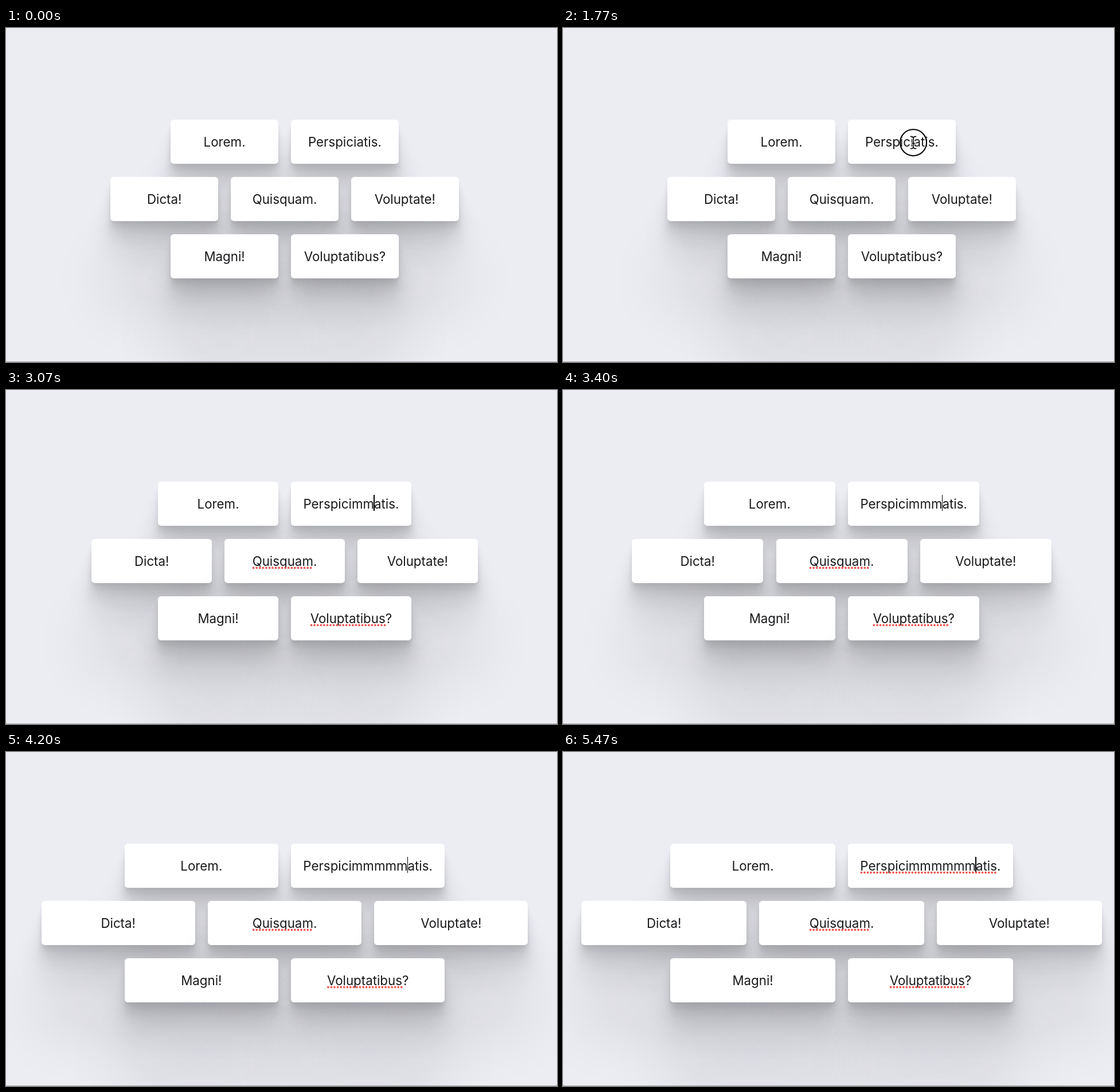
Animation of 961 by 583 pixels, one loop 5760 ms. Source, as an HTML page:

```html
<!DOCTYPE html>
<html lang="en">
<head>
<meta charset="utf-8">
<title>Growing cards</title>
<style>
  html, body { margin: 0; width: 100%; height: 100%; overflow: hidden; background: #ecedf3; }
  #stage {
    position: relative; width: 961px; height: 583px; overflow: hidden;
    font: 400 22.3px/32px Inter, sans-serif; font-optical-sizing: none; color: #18191b;
  }
  .card {
    --ink: 0, 12, 16;
    position: absolute; height: 77.5px; border-radius: 5.6px; background: #fff;
    display: flex; align-items: center; justify-content: center; white-space: pre;
    box-shadow:
      0 3.9px 3.1px rgba(var(--ink), .034),
      0 9.4px 7.4px rgba(var(--ink), .048),
      0 17.5px 14px rgba(var(--ink), .06),
      0 31.2px 25px rgba(var(--ink), .072),
      0 58.5px 46.8px rgba(var(--ink), .086),
      0 140px 112px rgba(var(--ink), .12);
  }
  .caret { position: relative; }
  .caret i {
    position: absolute; left: -.6px; top: -1.2px; width: 1.5px; height: 28px; background: #000;
  }
  #edge { position: absolute; left: 0; top: 582px; width: 961px; height: 1px; background: #a9aaad; }
  svg { position: absolute; left: 0; top: 0; }
  .dots line { stroke: #f2544f; stroke-width: 3.8; stroke-linecap: round; stroke-dasharray: 0 5.56; }
</style>
</head>
<body>
<div id="stage">
  <div id="edge"></div>
  <svg id="overlay" width="961" height="583" fill="none">
    <g class="dots"></g>
    <circle id="ring" cx="611" cy="200" r="23" stroke="#000" stroke-width="2"/>
    <g id="beam" stroke-linecap="round">
      <path id="beamHalo" stroke="#fff" stroke-width="3.6"/>
      <path id="beamLine" stroke="#000" stroke-width="1.6"/>
    </g>
    <path id="arrow" d="M0 0V17.5L4.1 13.7L6.9 20L9.8 18.7L7 12.6H12.4Z"
      fill="#000" stroke="#fff" stroke-width="1.4" stroke-linejoin="round"/>
  </svg>
</div>
<script>
const LOOP = 5760, CENTER = 486, GAP = 22.3, TOP = 159.8, PITCH = 100;
const KEYS = [2630, 2930, 3400, 3630, 3830, 4470];
const CLICK = 1770, MARKED = 1830, LAST_MARK = 5470;

const $ = id => document.getElementById(id);
const stage = $('stage'), overlay = $('overlay'), dots = overlay.querySelector('.dots');

// slot: horizontal place in card steps from the centre
const cards = [
  ['Lorem', '.', 0, -.5], ['Perspiciatis', '.', 0, .5],
  ['Dicta', '!', 1, -1], ['Quisquam', '.', 1, 0], ['Voluptate', '!', 1, 1],
  ['Magni', '!', 2, -.5], ['Voluptatibus', '?', 2, .5]
].map(([text, mark, row, slot]) => {
  const box = document.createElement('div'), word = document.createElement('span');
  box.className = 'card';
  box.style.top = TOP + row * PITCH + 'px';
  word.textContent = text;
  box.append(word, mark);
  stage.insertBefore(box, overlay);
  return { box, word, row, slot };
});

const edited = cards[1].word;
edited.innerHTML = '<span>Perspici</span><span class="caret"><i></i></span>atis';
const head = edited.firstChild, caret = edited.querySelector('i');

const underlines = [[3, MARKED], [6, MARKED], [1, LAST_MARK]].map(([index, from]) => {
  const line = document.createElementNS('http://www.w3.org/2000/svg', 'line');
  dots.append(line);
  return { line, card: cards[index], from };
});

const beamPath = 'M-4.6-10.6Q-.4-10.6 0-7.8Q.4-10.6 4.6-10.6M0-7.8V7.8' +
  'M-4.6 10.6Q-.4 10.6 0 7.8Q.4 10.6 4.6 10.6M-2.6 1.2H2.6';
$('beamHalo').setAttribute('d', beamPath);
$('beamLine').setAttribute('d', beamPath);

const within = (t, a, b) => t >= a && t < b;
const progress = (t, a, b) => Math.min(1, Math.max(0, (t - a) / (b - a)));
const mix = (a, b, p) => a + (b - a) * p;
const show = (el, on) => { el.style.visibility = on ? 'visible' : 'hidden'; };

function pointer(t) {
  const enter = 1 - (1 - progress(t, 500, 1100)) ** 2;
  const u = progress(t, 1100, 1470), settle = u * u * (3 - 2 * u);
  return [
    mix(mix(815, 619.5, enter), 611, settle),
    mix(mix(-14, 184.5, enter), 200, settle)
  ];
}

function layout(t) {
  const typed = KEYS.filter(k => t >= k).length;
  const width = typed ? 190 + 19.5 * (typed - 1) : 187.5;
  const text = 'Perspici' + 'm'.repeat(typed);
  if (head.textContent !== text) head.textContent = text;
  for (const { box, slot } of cards) {
    box.style.width = width + 'px';
    box.style.left = CENTER + slot * (width + GAP) - width / 2 + 'px';
  }
}

function drawUnderlines(t) {
  const origin = stage.getBoundingClientRect().left;
  for (const { line, card, from } of underlines) {
    show(line, t >= from);
    const r = card.word.getBoundingClientRect();
    const y = TOP + card.row * PITCH + 50.6;
    line.setAttribute('x1', r.left - origin + 2);
    line.setAttribute('x2', r.right - origin - 1);
    line.setAttribute('y1', y);
    line.setAttribute('y2', y);
  }
}

function drawPointer(t) {
  const [x, y] = pointer(t);
  const visible = within(t, 530, KEYS[0]);
  const overCard = y > TOP && x < 685;
  for (const [id, on] of [['beam', overCard], ['arrow', !overCard]]) {
    $(id).setAttribute('transform', `translate(${x} ${y})`);
    show($(id), visible && on);
  }
  show($('ring'), within(t, CLICK, 1850));
}

function frame(now) {
  const t = now % LOOP;
  layout(t);
  show(caret, within(t, 1800, 2300) || within(t, KEYS[0], 4930) || t >= 5430);
  drawUnderlines(t);
  drawPointer(t);
  requestAnimationFrame(tick);
}

const start = performance.now();
function tick() { frame(performance.now() - start); }
tick();
</script>
</body>
</html>
```
